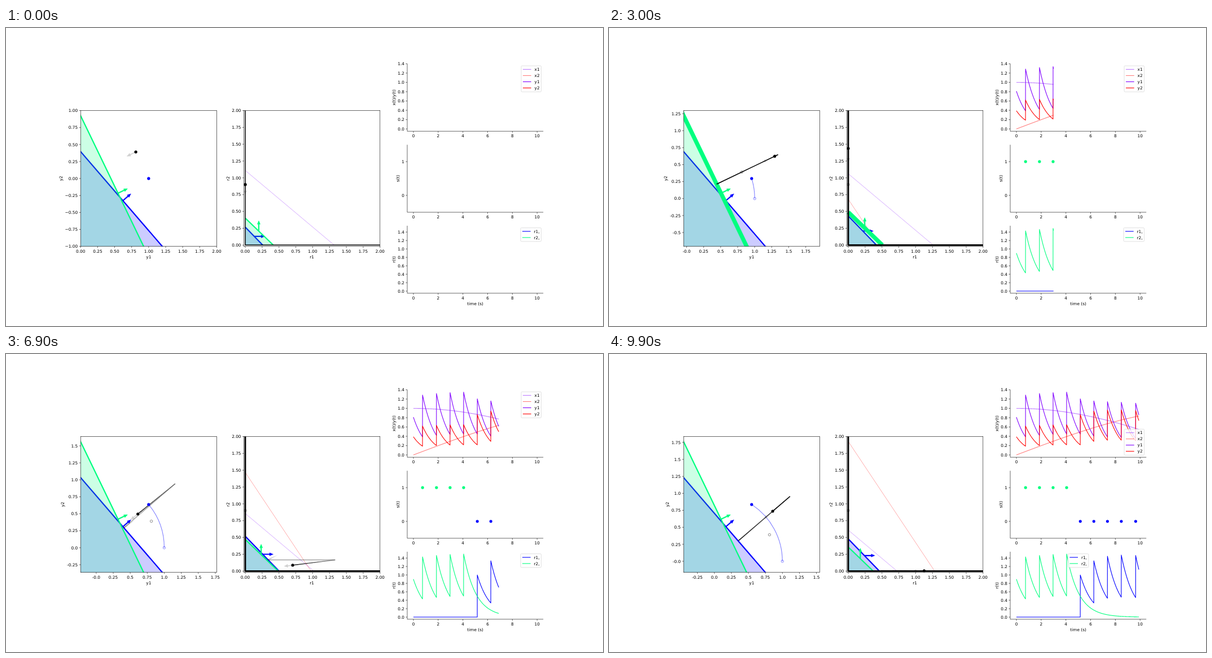
An HTML page for the animation above (10 s loop, 1058 px wide and 529 px high).

```html
<!DOCTYPE html>
<html lang="en">
<head>
<meta charset="utf-8">
<title>Two-neuron spiking network</title>
<style>
  html, body { margin: 0; width: 100%; height: 100%; overflow: hidden; background: #fff; }
  svg { display: block; width: 100vw; height: 100vh; }
  text { font: 7.35px "DejaVu Sans", sans-serif; fill: #000; }
  .mid { text-anchor: middle; }
  .end { text-anchor: end; }
</style>
</head>
<body>
<svg viewBox="0 0 1058 529" xmlns="http://www.w3.org/2000/svg">
  <defs></defs>
  <g id="live"></g>
  <g id="frame"></g>
  <g id="top"></g>
</svg>
<script>
const EM = 7.347, TICK = 2.57, LW = 1.1;
const BLUE = '#0000ff', GREEN = '#00ff7f', VIOLET = '#8000ff', RED = '#ff0000';
const STEPS = 200, PER_FRAME = 20, FRAMES = 100;
const $ = s => document.querySelector(s);
const n2 = v => v.toFixed(2);

// Network: unit decoder columns, threshold 0.5, unit leak
const angles = [Math.PI / 7 + Math.PI / 12, Math.PI / 7];
const dec = angles.map(a => [Math.cos(a), Math.sin(a)]);
const mix = Math.cos(angles[0] - angles[1]);
const colors = [BLUE, GREEN];
const signal = t => [Math.cos(0.1 * t), Math.sin(0.1 * t)];
const bound = (i, t) => Math.cos(0.1 * t - angles[i]) - 0.5;
const readout = r => [0, 1].map(k => dec[0][k] * r[0] + dec[1][k] * r[1]);

const hist = [], spikes = [];
(function simulate() {
  const leak = Math.exp(-1 / STEPS);
  let r = [0, 0.9];
  for (let n = 0; n <= PER_FRAME * FRAMES; n++) {
    const t = n / STEPS;
    if (n) r = r.map(v => v * leak);
    const v = [bound(0, t) - r[0] - mix * r[1], bound(1, t) - mix * r[0] - r[1]];
    const i = v[0] >= v[1] ? 0 : 1;
    if (v[i] > 0) { r[i] += 1; spikes.push({ n, t, i }); }
    hist.push({ t, r: r.slice(), x: signal(t), y: readout(r) });
  }
})();

// Axes: pixel box plus data limits, which may be changed later
const COL = 241.162, ROW = 119.803;
function axes(id, x, y, w, h, x0, x1, y0, y1) {
  const ax = { id, x, y, w, h, x0, x1, y0, y1 };
  ax.px = v => x + (v - ax.x0) / (ax.x1 - ax.x0) * w;
  ax.py = v => y + (ax.y1 - v) / (ax.y1 - ax.y0) * h;
  return ax;
}
const plane = axes('a', 132.25, 146.56, COL, COL, 0, 2, -1, 1);
const rates = axes('b', 421.644, 146.56, COL, COL, -0.02, 2, -0.02, 2);
const strip = (id, row, y0, y1) =>
  axes(id, 711.038, 63.48 + row * ROW * 1.2, COL, ROW, -0.5, 10.5, y0, y1);
const outputs = strip('c', 0, -0.05, 1.4);
const raster = strip('d', 1, -0.5, 1.5);
const traces = strip('e', 2, -0.05, 1.55);
const all = [plane, rates, outputs, raster, traces];

// SVG helpers
const pt = p => n2(p[0]) + ',' + n2(p[1]);
const line = (pts, col, w, op = 1) =>
  `<polyline points="${pts.map(pt).join(' ')}" fill="none" stroke="${col}" stroke-width="${w}" stroke-opacity="${n2(op)}" stroke-linejoin="round"/>`;
const area = (pts, col, op) => `<polygon points="${pts.map(pt).join(' ')}" fill="${col}" fill-opacity="${op}"/>`;
const dot = (p, col) => `<circle cx="${n2(p[0])}" cy="${n2(p[1])}" r="2.57" fill="${col}"/>`;
const ring = (p, col) =>
  `<circle cx="${n2(p[0])}" cy="${n2(p[1])}" r="2.2" fill="none" stroke="${col}" stroke-width=".73" stroke-opacity=".6"/>`;
const text = (s, x, y, cls = '') => `<text class="${cls}" x="${n2(x)}" y="${n2(y)}">${s}</text>`;
const upright = (s, x, y) => `<text class="mid" transform="translate(${n2(x)} ${n2(y)}) rotate(-90)">${s}</text>`;
const clip = (ax, body) => `<g clip-path="url(#${ax.id})">${body}</g>`;

// Arrow of given shaft length along unit direction d (screen space)
function arrow(p, d, shaft, col, op = 1, half = 1.1) {
  const at = (s, o) => [p[0] + d[0] * s - d[1] * o, p[1] + d[1] * s + d[0] * o];
  return area([at(0, half), at(shaft, half), at(shaft, 3), at(shaft + 7.2, 0),
    at(shaft, -3), at(shaft, -half), at(0, -half)], col, op);
}

function xTick(ax, v, label) {
  const x = ax.px(v), b = ax.y + ax.h;
  return line([[x, b], [x, b + TICK]], '#000', 0.59) + text(label, x, b + 10.9, 'mid');
}
function yTick(ax, v, label) {
  const y = ax.py(v);
  return line([[ax.x - TICK, y], [ax.x, y]], '#000', 0.59) + text(label, ax.x - 5.14, y + 2.7, 'end');
}
const range = (a, b, step) => Array.from({ length: Math.floor((b - a) / step + 1.001) }, (_, i) => a + i * step);

function drawFrames() {
  $('defs').innerHTML = all.map(a =>
    `<clipPath id="${a.id}"><rect x="${a.x}" y="${a.y}" width="${a.w}" height="${a.h}"/></clipPath>`).join('');
  let s = '';
  for (const a of all) {
    const r = a.x + a.w, b = a.y + a.h;
    s += a === plane || a === rates
      ? `<rect x="${a.x}" y="${a.y}" width="${a.w}" height="${a.h}" fill="none" stroke="#000" stroke-width=".59"/>`
      : line([[a.x, a.y], [a.x, b], [r, b]], '#000', 0.59);
  }
  for (const v of range(0, 2, 0.25)) s += xTick(rates, v, n2(v)) + yTick(rates, v, n2(v));
  for (const a of [outputs, raster, traces])
    for (const v of range(0, 10, 2)) s += xTick(a, v, v);
  for (const a of [outputs, traces])
    for (const v of range(0, 1.4, 0.2)) s += yTick(a, v, v.toFixed(1));
  s += yTick(raster, 0, 0) + yTick(raster, 1, 1);
  s += text('y1', 252.8, 408.7, 'mid') + text('r1', 542.2, 408.7, 'mid') + text('time (s)', 831.6, 492, 'mid');
  s += upright('r2', 395.6, 267.1) + upright('x(t)/y(t)', 689.6, 123.4) +
    upright('s(t)', 696.6, 267.1) + upright('r(t)', 689.6, 410.9);
  $('#frame').innerHTML = s;
}

// Ticks of the moving view
function planeTicks(k) {
  if (!k) {
    const f = v => n2(v).replace('-', '\u2212');
    return range(0, 2, 0.25).map(v => xTick(plane, v, f(v))).join('') +
      range(-1, 1, 0.25).map(v => yTick(plane, v, f(v))).join('') + upright('y2', 99.9, 267.1);
  }
  const ticks = (lo, hi) => {
    const first = Math.ceil(lo / 0.25) * 0.25;
    return range(first, hi, 0.25).filter(v => v <= hi).map((v, i) => {
      const label = !v && !i && lo < 0 ? '-0.0' : v % 0.5 ? n2(v) : v.toFixed(1);
      return [v, label];
    });
  };
  const ys = ticks(plane.y0, plane.y1);
  const wide = ys.some(([, l]) => l.length > 4);
  return ticks(plane.x0, plane.x1).map(([v, l]) => xTick(plane, v, l)).join('') +
    ys.map(([v, l]) => yTick(plane, v, l)).join('') + upright('y2', wide ? 103.4 : 106, 267.1);
}

// Fading path over the last second
function trail(n, map) {
  let s = '';
  const len = 4;
  for (let a = Math.max(0, n - STEPS); a < n; a += len) {
    const b = Math.min(n, a + len);
    s += line(hist.slice(a, b + 1).map(map), '#000', 1.5, 1 - (n - b) / STEPS);
  }
  return s;
}

function drawPlane(k, now, flash) {
  const at = p => [plane.px(p[0]), plane.py(p[1])], unit = COL / 2;
  const c = at(now.x);
  let s = '';
  dec.forEach((d, i) => {
    const nrm = [d[0], -d[1]], base = [c[0] - 0.5 * unit * d[0], c[1] + 0.5 * unit * d[1]];
    const go = (a, b) => [base[0] + a * nrm[0] - b * nrm[1], base[1] + a * nrm[1] + b * nrm[0]];
    s += area([go(0, -400), go(0, 400), go(-600, 400), go(-600, -400)], colors[i], 0.2);
    s += line([go(0, -400), go(0, 400)], colors[i], flash === i ? 7.35 : 2.2);
    s += arrow(base, nrm, 0.1 * unit, colors[i]);
  });
  const p = at(now.y), len = Math.hypot(...now.y);
  const start = at([1, 0]);
  if (k) s += `<path d="M${pt(start)}A${unit} ${unit} 0 0 0 ${pt(c)}" fill="none" stroke="${BLUE}" stroke-opacity=".5" stroke-width="${LW}"/>`;
  s += arrow(p, [-now.y[0] / len, now.y[1] / len], 0.1 * len * unit, '#000', 0.18, 0.8);
  s += trail(k * PER_FRAME, h => at(h.y));
  s += ring(start, BLUE) + ring(at(hist[0].y), '#000') + dot(c, BLUE) + dot(p, '#000');
  return clip(plane, s);
}

function drawRates(k, now, flash) {
  const at = (a, b) => [rates.px(a), rates.py(b)], unit = COL / 2.02;
  const o = at(0, 0);
  let s = '';
  [VIOLET, RED].forEach((col, j) => {
    s += line([at(now.x[j] / dec[0][j], 0), at(0, now.x[j] / dec[1][j])], col, 0.75, 0.45);
  });
  [0, 1].forEach(i => {
    const v = bound(i, now.t), a = i ? v / mix : v, b = i ? v : v / mix;
    s += area([o, at(a, 0), at(0, b)], colors[i], 0.2);
    s += line([at(a, 0), at(0, b)], colors[i], flash === i ? 7.35 : 2.2);
    s += arrow(at(b / 2, a / 2), i ? [0, -1] : [1, 0], 0.1 * unit, colors[i]);
  });
  // The zero lines thicken as their soft edges build up
  s += line([at(0, 3), o, at(3, 0)], '#000', 2.8 - 1.3 * 0.77 ** k);
  const p = at(...now.r), len = Math.hypot(...now.r);
  s += arrow(p, [-now.r[0] / len, now.r[1] / len], 0.1 * len * unit, '#000', 0.18, 0.8);
  s += trail(k * PER_FRAME, h => at(...h.r));
  s += ring(at(...hist[0].r), '#000') + dot(p, '#000');
  return clip(rates, s);
}

// Legend goes to the first spot that covers the fewest data points
const spots = [[1, 0], [0, 0], [0, 1], [1, 1], [1, 0.5], [0, 0.5], [0.5, 1], [0.5, 0], [0.5, 0.5]];
function legend(ax, items, curves, textW) {
  const pad = EM / 2, w = EM * 3.6 + textW, h = items.length * 11 + 2.2;
  let best = null;
  for (const [fx, fy] of spots) {
    const x = ax.x + pad + fx * (ax.w - 2 * pad - w);
    const y = ax.y + pad + fy * (ax.h - 2 * pad - h);
    let bad = 0;
    for (const c of curves) {
      const hits = c.filter(p => p[0] > x && p[0] < x + w && p[1] > y && p[1] < y + h).length;
      bad += hits + (hits > 0);
    }
    if (!best || bad < best.bad) best = { x, y, bad };
    if (!bad) break;
  }
  const { x, y } = best;
  let s = `<rect x="${n2(x)}" y="${n2(y)}" width="${n2(w)}" height="${h}" rx="1.5" fill="#fff" fill-opacity=".8" stroke="#ccc" stroke-opacity=".8" stroke-width=".73"/>`;
  items.forEach(([name, col, op], i) => {
    const cy = y + 6.3 + 11 * i, hx = x + 0.4 * EM;
    s += line([[hx, cy], [hx + 2 * EM, cy]], col, LW, op) + text(name, hx + 2.8 * EM, cy + 2.6);
  });
  return s;
}

const outItems = [['x1', VIOLET, 0.5], ['x2', RED, 0.5], ['y1', VIOLET, 1], ['y2', RED, 1]];
const rateItems = [['r1,', BLUE, 1], ['r2,', GREEN, 1]];

function drawStrip(ax, past, items, getters, textW) {
  const curves = getters.map(get => past.map(h => [ax.px(h.t), ax.py(get(h))]));
  const body = past.length > 1 ? curves.map((c, i) => line(c, items[i][1], LW, items[i][2])).join('') : '';
  return [clip(ax, body), legend(ax, items, curves, textW)];
}

function render(k) {
  const n = k * PER_FRAME, now = hist[n], past = hist.slice(0, n + 1);
  const fired = spikes.filter(s => s.n <= n);
  const last = fired[fired.length - 1];
  const flash = last && last.n > n - PER_FRAME ? last.i : -1;
  plane.x0 = now.x[0] - 1; plane.x1 = now.x[0] + 1;
  plane.y0 = now.x[1] - 1; plane.y1 = now.x[1] + 1;

  const [outBody, outKey] = drawStrip(outputs, past, outItems,
    [h => h.x[0], h => h.x[1], h => h.y[0], h => h.y[1]], 1.228 * EM);
  const [rateBody, rateKey] = drawStrip(traces, past, rateItems,
    [h => h.r[0], h => h.r[1]], 1.365 * EM);
  $('#live').innerHTML = drawPlane(k, now, flash) + drawRates(k, now, flash) + outBody + rateBody +
    fired.map(s => dot([raster.px(s.t), raster.py(s.i)], colors[s.i])).join('');
  $('#top').innerHTML = planeTicks(k) + outKey + rateKey;
}

drawFrames();
let shown = -1;
const t0 = performance.now();
function tick() {
  const k = Math.floor(Math.max(0, performance.now() - t0) / 100) % FRAMES;
  if (k !== shown) render(shown = k);
  requestAnimationFrame(tick);
}
tick();
</script>
</body>
</html>
```
